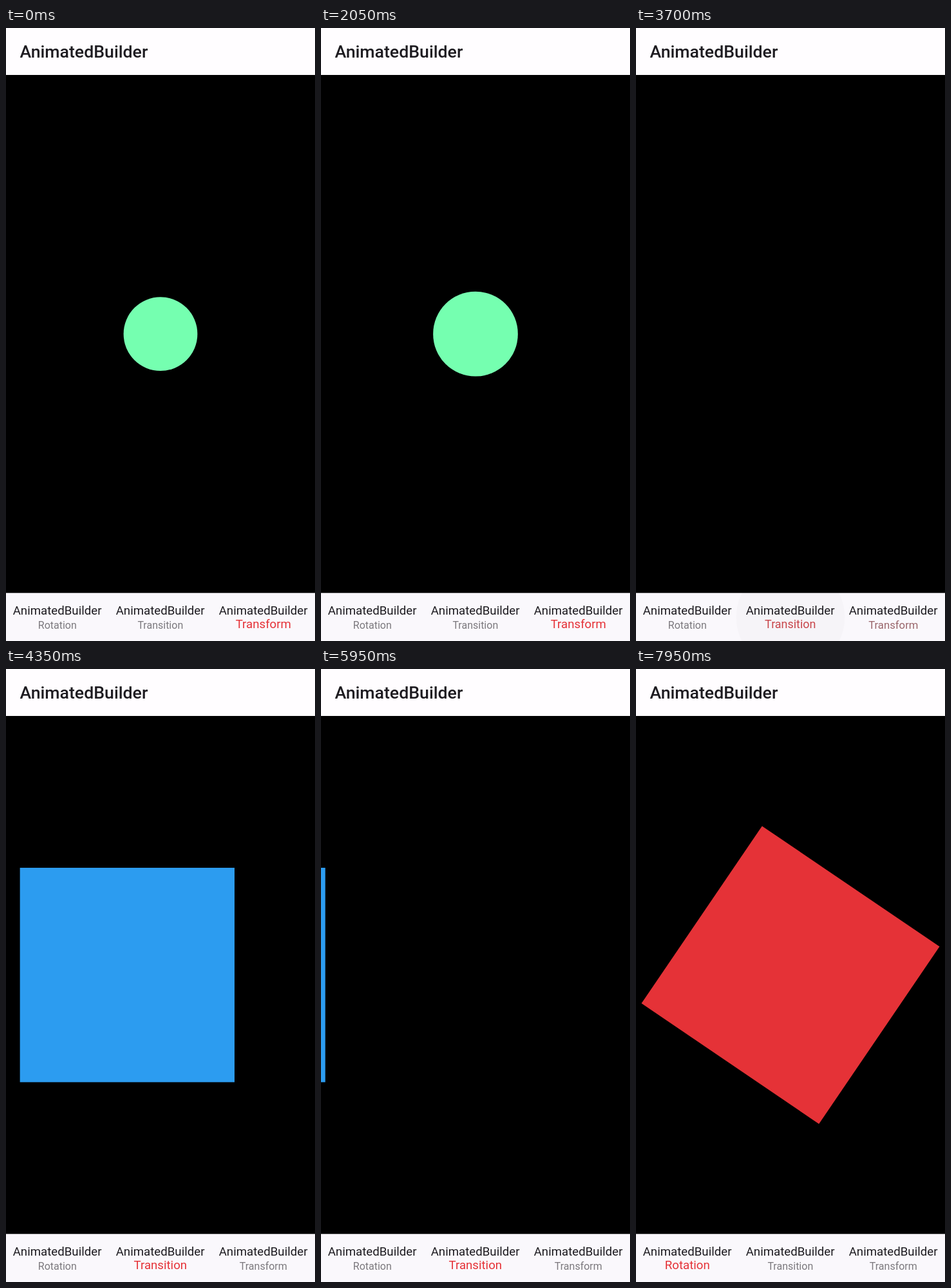
An HTML page that plays this animation: 480 by 953 pixels, repeating every 8 s.

```html
<!DOCTYPE html>
<html lang="en">
<head>
<meta charset="utf-8">
<title>AnimatedBuilder</title>
<style>
  html, body { margin: 0; width: 100%; height: 100%; overflow: hidden; background: #000; }
  svg { display: block; width: 100%; height: 100%; font-family: Roboto, sans-serif; }
</style>
</head>
<body>
<svg id="stage" viewBox="0 0 480 953" xmlns="http://www.w3.org/2000/svg">
  <rect width="480" height="953" fill="#000"/>
  <rect id="shape"/>
  <rect width="480" height="73" fill="#fffdff"/>
  <text x="21.6" y="46" font-size="26.67" font-weight="500" fill="#1d1b20">AnimatedBuilder</text>
  <clipPath id="bar"><rect y="878.3" width="480" height="74.7"/></clipPath>
  <rect y="878.3" width="480" height="74.7" fill="#faf8fc"/>
  <circle id="ripple" cy="916" fill="#1d1b20" opacity="0" clip-path="url(#bar)"/>
  <g id="tabs" text-anchor="middle"></g>
</svg>
<script>
const LOOP = 8000, SIZE = 333.33, CX = 240, CY = 475.7;
const GREY = [124, 121, 126], RED = [229, 50, 55];
const ROTATION = 0, TRANSITION = 1, TRANSFORM = 2;

// Times at which a tab opens; the first one is already running at time zero.
const pages = [
  { tab: TRANSFORM, start: -307 },
  { tab: TRANSITION, start: 3613, press: 3440 },
  { tab: ROTATION, start: 7761, press: 7640 }
];

const shape = document.getElementById('shape');
const ripple = document.getElementById('ripple');
const clamp = x => Math.min(1, Math.max(0, x));
const mix = (a, b, k) => a + (b - a) * k;
const set = (el, attrs) => {
  for (const key in attrs) el.setAttribute(key, attrs[key]);
};

function addText(x, y, size, fill, text) {
  const el = document.createElementNS('http://www.w3.org/2000/svg', 'text');
  set(el, { x, y, 'font-size': size, fill });
  el.textContent = text;
  document.getElementById('tabs').append(el);
  return el;
}

const labels = ['Rotation', 'Transition', 'Transform'].map((name, i) => {
  const x = 80 + 160 * i;
  addText(x - 0.4, 911.7, 18.67, '#1d1b20', 'AnimatedBuilder');
  return addText(x - 0.2, 933.8, 16, '#7c797e', name);
});

function bezier(x1, y1, x2, y2) {
  const at = (a, b, s) => 3 * (1 - s) * (1 - s) * s * a + 3 * (1 - s) * s * s * b + s * s * s;
  return x => {
    let lo = 0, hi = 1;
    for (let i = 0; i < 24; i++) {
      const mid = (lo + hi) / 2;
      if (at(x1, x2, mid) < x) lo = mid; else hi = mid;
    }
    return at(y1, y2, (lo + hi) / 2);
  };
}
const grow = bezier(0.2, 0.45, 0.39, 1);
const standard = bezier(0.4, 0, 0.2, 1);

function drawSquare(dx, size, radius, angle, fill) {
  set(shape, {
    x: CX + dx - size / 2, y: CY - size / 2, width: size, height: size,
    rx: Math.min(radius, size / 2), fill, transform: `rotate(${angle} ${CX} ${CY})`
  });
}

const draw = {
  [TRANSFORM](t) {
    const k = grow((t % 2000) / 2000);
    drawSquare(0, SIZE * k, 22 + 72 * (1 - k), 0, '#75ffb0');
  },
  // Slides in, rests in the middle, slides out.
  [TRANSITION](t) {
    const u = t % 2018;
    const dx = (Math.min(0, u - 800) + Math.max(0, u - 1175)) * SIZE / 400;
    drawSquare(dx, SIZE, 0, 0, '#2c9cf0');
  },
  [ROTATION](t) {
    drawSquare(0, SIZE, 0, t * 0.18, '#e53237');
  }
};

function drawLabels(now, index) {
  const page = pages[index], previous = pages[index - 1];
  const k = standard(clamp((now - page.start) / 190));
  labels.forEach((el, i) => {
    const on = i === page.tab ? k : previous && i === previous.tab ? 1 - k : 0;
    const rgb = GREY.map((c, j) => Math.round(mix(c, RED[j], on)));
    set(el, {
      'font-size': mix(16, 18.67, on), y: mix(933.8, 933.2, on), fill: `rgb(${rgb})`
    });
  });
}

function drawRipple(now) {
  const page = pages.find(p => now >= p.press && now < p.press + 300);
  if (!page) return set(ripple, { opacity: 0 });
  const k = (now - page.press) / 300;
  set(ripple, {
    cx: 80 + 160 * page.tab, r: mix(20, 85, standard(k)),
    opacity: 0.06 * Math.min(1, k * 5, (1 - k) * 2)
  });
}

function render(now) {
  let index = pages.length - 1;
  while (now < pages[index].start) index--;
  const page = pages[index];
  draw[page.tab](now - page.start);
  drawLabels(now, index);
  drawRipple(now);
}

const begin = performance.now();
function tick() {
  render((performance.now() - begin) % LOOP);
  requestAnimationFrame(tick);
}
tick();
</script>
</body>
</html>
```
